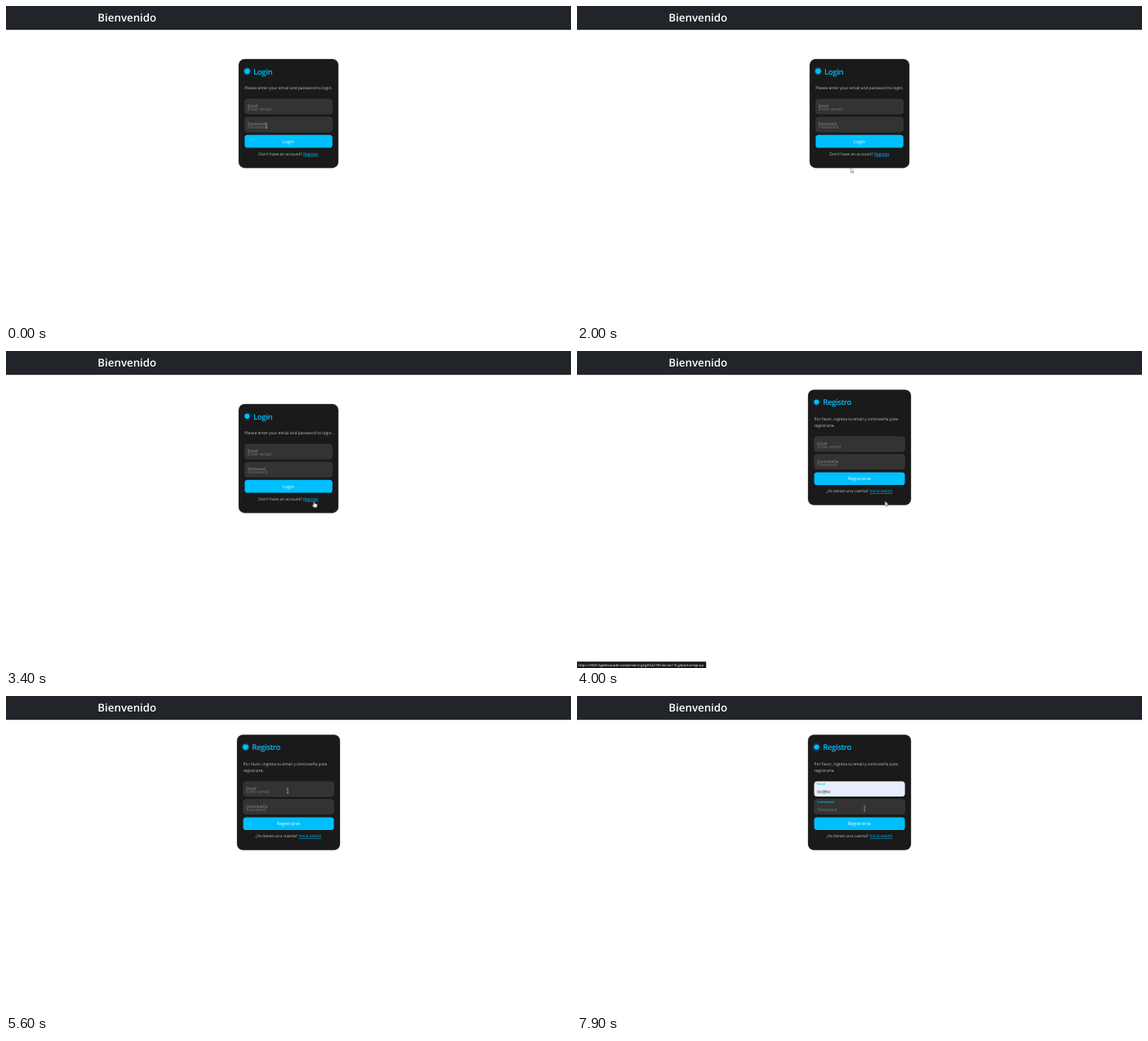
An HTML page for the animation above (8000 ms loop, 692 by 388 pixels).

```html
<!DOCTYPE html>
<html lang="es">
<head>
<meta charset="utf-8">
<title>Bienvenido</title>
<style>
  html, body { margin: 0; width: 100%; height: 100%; overflow: hidden; background: #fff; }
  svg { display: block; width: 100vw; height: 100vh; }
  text { font-family: "Open Sans", "Noto Sans", sans-serif; text-rendering: geometricPrecision; white-space: pre; }

  .heading { font-size: 13.3px; font-weight: 600; fill: #fff; }
  .card { fill: #1a1a1a; stroke: #333; stroke-width: .36; }
  .title { font-size: 9.5px; font-weight: 600; letter-spacing: -.36px; fill: #00bfff; }
  .message { font-size: 4.94px; fill: #c4c4c4; }
  .field { fill: #333; stroke: #4a4a4a; stroke-width: .36; }
  .label { font-size: 4.9px; fill: #999; }
  .placeholder { font-size: 5.45px; fill: #757575; }
  .button { fill: #00bfff; }
  .button-text { font-size: 5.45px; fill: #fff; text-anchor: middle; }
  .centered { text-anchor: middle; }
  .link { fill: #00bfff; text-decoration: underline; }
  .value { font-size: 5.45px; fill: #222; }
  .dot { fill: #00bfff; }

  .pulse { fill: #00bfff; transform-box: fill-box; transform-origin: center; animation: pulse 1s linear infinite; }
  #login .pulse { animation-delay: -.5s; }
  #register .pulse { animation-delay: -.92s; }
  @keyframes pulse { from { transform: scale(.9); opacity: 1; } to { transform: scale(1.8); opacity: 0; } }

  /* Hard switches over the 8 s loop */
  .timed { animation: 8s step-end infinite; }
  #login { animation-name: login; }
  #register { animation-name: register; }
  #status { animation-name: status; }
  #filled { animation-name: filled; }
  #preview { animation-name: preview; }
  #entered { animation-name: entered; }
  #suggestion { animation-name: suggestion; }
  #caret-start { animation-name: caret-start; }
  #caret-end { animation-name: caret-end; }
  #caret-password { animation-name: caret-password; }
  #arrow { animation-name: arrow; }
  #hand { animation-name: hand; }
  #beam { animation-name: beam; }
  @keyframes login { 0% { opacity: 1; } 48.75%, 100% { opacity: 0; } }
  @keyframes register { 0% { opacity: 0; } 48.75%, 100% { opacity: 1; } }
  @keyframes status { 0% { opacity: 0; } 43.75% { opacity: 1; } 55%, 100% { opacity: 0; } }
  @keyframes filled { 0% { opacity: 0; } 76.25%, 100% { opacity: 1; } }
  @keyframes preview { 0% { opacity: 0; } 76.25% { opacity: 1; } 80.6%, 100% { opacity: 0; } }
  @keyframes entered { 0% { opacity: 0; } 80.6%, 100% { opacity: 1; } }
  @keyframes suggestion { 0% { opacity: 0; } 73.75% { opacity: 1; } 80.6%, 100% { opacity: 0; } }
  @keyframes caret-start { 0% { opacity: 0; } 72.5% { opacity: 1; } 78.75%, 100% { opacity: 0; } }
  @keyframes caret-end { 0% { opacity: 0; } 80.6% { opacity: 1; } 86.85%, 100% { opacity: 0; } }
  @keyframes caret-password { 0% { opacity: 0; } 87.5% { opacity: 1; } 93.75%, 100% { opacity: 0; } }
  @keyframes arrow {
    0% { opacity: 0; } 6% { opacity: 1; } 39.5% { opacity: 0; } 48.75% { opacity: 1; }
    61% { opacity: 0; } 75% { opacity: 1; } 81.5%, 100% { opacity: 0; }
  }
  @keyframes hand { 0% { opacity: 0; } 39.5% { opacity: 1; } 48.75%, 100% { opacity: 0; } }
  @keyframes beam {
    0% { opacity: 1; } 6% { opacity: 0; } 61% { opacity: 1; } 75% { opacity: 0; } 81.5%, 100% { opacity: 1; }
  }

  /* Floating labels */
  #email-label { animation: float-email 8s linear infinite; }
  #password-label { animation: float-password 8s linear infinite; }
  @keyframes float-email {
    0%, 72.5% { transform: none; font-size: 4.9px; font-weight: 400; fill: #999; }
    76.25%, 100% { transform: translateY(-5.8px); font-size: 3.8px; font-weight: 600; fill: #00bfff; }
  }
  @keyframes float-password {
    0%, 87.5% { transform: none; font-size: 4.9px; font-weight: 400; fill: #999; }
    91.25%, 100% { transform: translateY(-5.8px); font-size: 3.8px; font-weight: 600; fill: #00bfff; }
  }

  #pointer { animation: travel 8s linear infinite; }
  @keyframes travel {
    0%, 5% { transform: translate(318.8px, 146.5px); }
    7.5% { transform: translate(240px, 90px); }
    10% { transform: translate(42px, 18px); }
    12.5% { transform: translate(160px, 170px); }
    14% { transform: translate(240px, 248px); }
    16.25% { transform: translate(268px, 217px); }
    22.5%, 23.75% { transform: translate(329.5px, 197px); }
    25% { transform: translate(335px, 198px); }
    30% { transform: translate(366px, 206px); }
    35%, 36.25% { transform: translate(393px, 202px); }
    40%, 50% { transform: translate(377.2px, 183.7px); }
    57.5%, 60% { transform: translate(371.7px, 124.8px); }
    63.75% { transform: translate(360px, 118px); }
    70%, 73.75% { transform: translate(345px, 116px); }
    76.9%, 80% { transform: translate(358.3px, 133.6px); }
    86.25%, 100% { transform: translate(352.2px, 137.8px); }
  }
</style>
</head>
<body>
<svg viewBox="0 0 692 388" preserveAspectRatio="none">
  <rect width="692" height="388" fill="#fff"/>
  <rect width="692" height="29.2" fill="#212529"/>
  <text class="heading" x="112.3" y="18.9">Bienvenido</text>

  <g id="login" class="timed">
    <rect class="card" x="285" y="65" width="122" height="133.2" rx="7.2"/>
    <circle class="pulse" cx="295.3" cy="79.8" r="3.2"/>
    <circle class="dot" cx="295.3" cy="79.8" r="3.1"/>
    <text class="title" x="303" y="83.5">Login</text>
    <text class="message" x="292.3" y="102.2">Please enter your email and password to login.</text>

    <rect class="field" x="292.4" y="114" width="107.2" height="18.3" rx="3.6"/>
    <text class="placeholder" x="296" y="128.2">Enter email</text>
    <text class="label" x="295.8" y="123.8">Email</text>

    <rect class="field" x="292.4" y="136" width="107.2" height="18.3" rx="3.6"/>
    <text class="placeholder" x="296" y="150">Password</text>
    <text class="label" x="295.8" y="145.9">Password</text>

    <rect class="button" x="292.3" y="157.8" width="107.5" height="15.7" rx="3.6"/>
    <text class="button-text" x="346" y="167.8">Login</text>
    <text class="message centered" x="346" y="182.7">Don't have an account? <tspan class="link">Register</tspan></text>
  </g>

  <g id="register" class="timed">
    <rect class="card" x="283" y="47.5" width="126" height="141" rx="7.2"/>
    <circle class="pulse" cx="293.4" cy="62.5" r="3.2"/>
    <circle class="dot" cx="293.4" cy="62.5" r="3.1"/>
    <text class="title" x="301.2" y="66.3">Registro</text>
    <text class="message" x="290.5" y="85.1">Por favor, ingresa tu email y contraseña para</text>
    <text class="message" x="290.5" y="93">registrarte.</text>

    <rect class="field" x="290.6" y="104.7" width="110.9" height="18.3" rx="3.6"/>
    <text class="placeholder" x="294.2" y="118.8">Enter email</text>
    <g id="filled" class="timed">
      <rect x="290.5" y="104.6" width="111.1" height="18.5" rx="3.6" fill="#e8f0fe"/>
      <text id="preview" class="value timed" x="294.3" y="118.6" style="font-size:4.8px">tic@tic</text>
      <text id="entered" class="value timed" x="294.3" y="118.8">tic@tic</text>
    </g>
    <rect id="caret-start" class="timed" x="294.1" y="112.9" width=".5" height="7.2" fill="#222"/>
    <rect id="caret-end" class="timed" x="311.4" y="112.9" width=".5" height="7.2" fill="#222"/>
    <text id="email-label" class="label" x="294" y="114.6">Email</text>

    <rect class="field" x="290.6" y="126.5" width="110.9" height="18.3" rx="3.6"/>
    <text class="placeholder" x="294.2" y="140.5">Password</text>
    <rect id="caret-password" class="timed" x="294.1" y="134.8" width=".4" height="7" fill="#fff"/>
    <text id="password-label" class="label" x="294" y="136.7">Contraseña</text>

    <rect class="button" x="290.5" y="148.4" width="111.1" height="15.7" rx="3.6"/>
    <text class="button-text" x="346" y="158.4">Registrarse</text>
    <text class="message centered" x="346" y="173.4">¿Ya tienes una cuenta? <tspan class="link">Inicia sesión</tspan></text>

    <g id="suggestion" class="timed">
      <rect x="328" y="127.6" width="53" height="12.8" rx="2" fill="#2b2c2e"/>
      <rect x="328.2" y="129.2" width="52.6" height="9.6" fill="#3a3b3d"/>
      <text x="330.6" y="135.7" font-size="4.5" font-weight="600" fill="#fff">tic@tic</text>
      <path d="M373.4 132.8l2.4 2.4m0-2.4l-2.4 2.4" stroke="#ccc" stroke-width=".5"/>
    </g>
  </g>

  <g id="status" class="timed">
    <rect y="380.2" width="158.2" height="7.8" fill="#17181a"/>
    <text x="1.4" y="385.6" font-size="4.15" fill="#fff">https://3000-4geeksacade-coolpenwins-g4g2tk22190.ws-eu116.gitpod.io/signup</text>
  </g>

  <g id="pointer">
    <path id="arrow" class="timed" d="M0 0V6.1L1.4 4.8L2.4 6.9L3.3 6.5L2.4 4.4H4.3Z" fill="#fff" stroke="#222" stroke-width=".4"/>
    <path id="hand" class="timed" d="M-.6 .6Q0 -.3 .6 .6V3L3.6 3.6Q4.2 3.9 4 5.2L3.3 7.8H-.2L-2.1 5Q-2.2 4 -1.3 4.3L-.6 5Z" fill="#fff" stroke="#222" stroke-width=".4"/>
    <path id="beam" class="timed" d="M-1.1 -2.9H1.1M0 -2.9V2.9M-1.1 2.9H1.1" fill="none" stroke="#ddd" stroke-width=".5"/>
  </g>
</svg>
</body>
</html>
```
